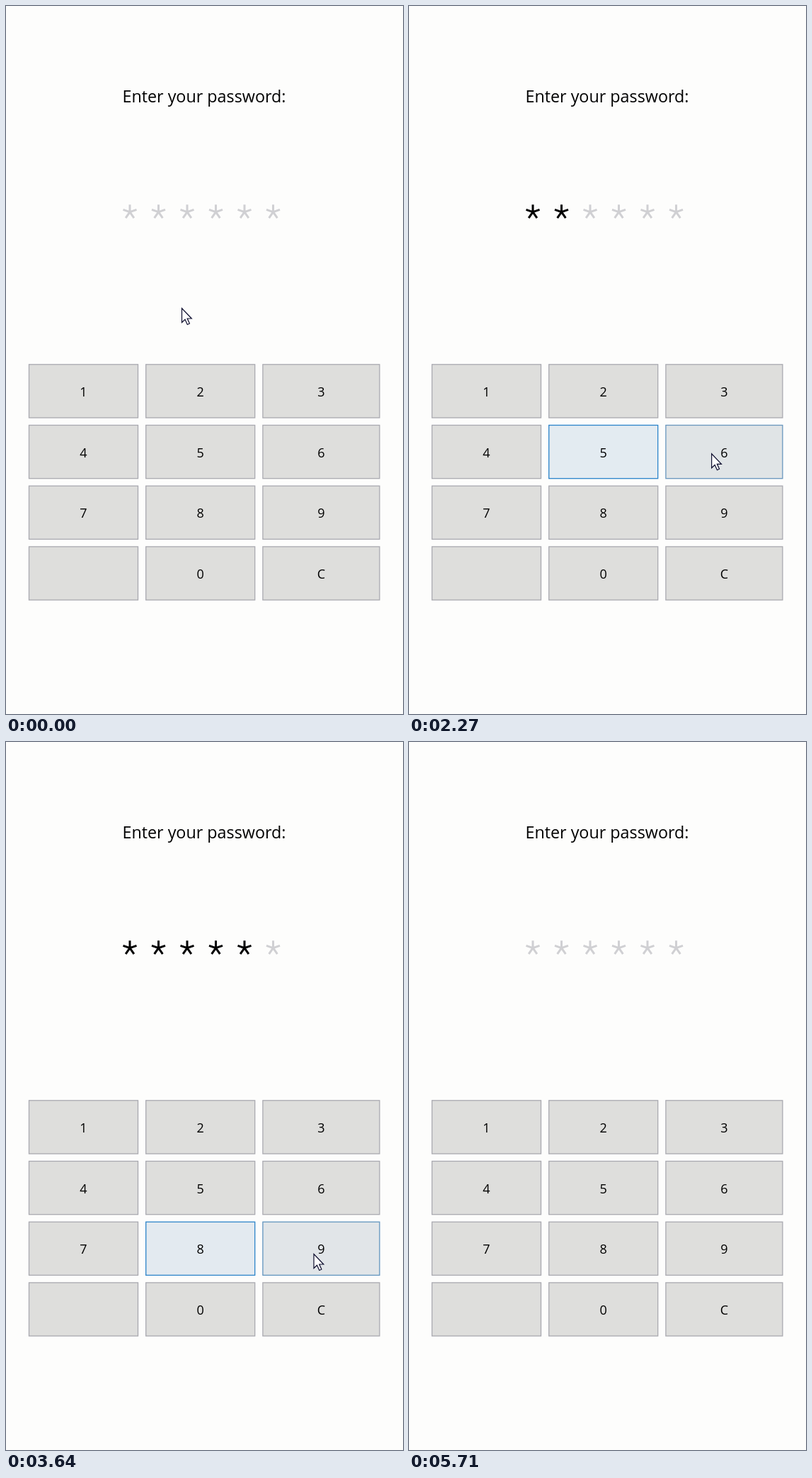
Animation of 561 by 999 pixels, one loop 5740 ms. Source, as an HTML page with a canvas:

```html
<!DOCTYPE html>
<html lang="en">
<head>
<meta charset="utf-8">
<title>Password keypad</title>
<style>
  html, body { margin: 0; width: 100%; height: 100%; overflow: hidden; background: #fdfdfc; }
  canvas { display: block; }
</style>
</head>
<body>
<canvas id="stage" width="561" height="999"></canvas>
<script>
const ctx = document.getElementById('stage').getContext('2d');
const LOOP = 5740, STEP = 10, CURSOR_GONE = 5690;
const TRAVEL = 220, LEAD = 100, HOLD = 120;   // glide time, pause before a press, press length
const FADE_IN = 200, FADE_OUT = 450;

// Button states as [fill, border]
const NORMAL = [[222, 222, 220], [169, 169, 176]];
const HOT = [[228, 238, 246], [10, 122, 208]];
const PRESSED = [[205, 230, 245], [20, 75, 115]];

// Where the cursor rests: arrival time, position, key pressed there
const stops = [
  { at: 0, x: 248, y: 426 },
  { at: 840, x: 257, y: 433 },
  { at: 1310, x: 105, y: 548, key: '1' },
  { at: 1790, x: 270, y: 617, key: '5' },
  { at: 2300, x: 435, y: 632, key: '6' },
  { at: 2790, x: 127, y: 648, key: '4' },
  { at: 3220, x: 272, y: 722, key: '8' },
  { at: 3660, x: 438, y: 722, key: '9' },
  { at: 4500, x: 449, y: 819, key: 'C' },
  { at: 5100, x: 440, y: 470 },
  { at: 5650, x: 250, y: 430 }
];
const presses = stops.filter(s => s.key).map(s => ({ key: s.key, down: s.at + LEAD, up: s.at + LEAD + HOLD }));

const buttons = [...'123456789 0C'].map((label, i) => {
  const col = i % 3;
  return {
    label, x: 32.5 + col * 165.2, y: 505.8 + Math.floor(i / 3) * 85.7,
    w: col < 2 ? 154 : 165, h: 75.2
  };
});

const mix = (a, b, k) => a + (b - a) * k;
const blend = (a, b, k) => a.map((v, i) => mix(v, b[i], k));
const rgb = c => `rgb(${c.map(Math.round)})`;

function cursorAt(t) {
  let { x, y } = stops[0];
  for (const stop of stops) {
    const k = Math.min(1, Math.max(0, (t - stop.at) / TRAVEL + 1));
    const eased = k * k * (3 - 2 * k);
    x = mix(x, stop.x, eased);
    y = mix(y, stop.y, eased);
  }
  return { x, y };
}

// Hover level of every button, replayed from the start of the loop
function hoverLevels(t) {
  const levels = buttons.map(() => 0);
  for (let s = 0; s <= t; s += STEP) {
    const c = cursorAt(s);
    buttons.forEach(({ x, y, w, h }, i) => {
      const over = c.x >= x && c.x <= x + w && c.y >= y && c.y <= y + h;
      const change = over ? STEP / FADE_IN : -STEP / FADE_OUT;
      levels[i] = Math.min(1, Math.max(0, levels[i] + change));
    });
  }
  return levels;
}

function drawText(text, x, y, size) {
  ctx.font = `${size}px "Open Sans", "Noto Sans", sans-serif`;
  ctx.textAlign = 'center';
  ctx.fillStyle = '#000';
  ctx.fillText(text, x, y);
}

function drawStar(x, y, filled) {
  ctx.strokeStyle = filled ? '#000' : '#d0d0d3';
  ctx.lineWidth = 3;
  ctx.beginPath();
  for (let i = 0; i < 5; i++) {
    const a = -Math.PI / 2 + i * Math.PI * 0.4;
    ctx.moveTo(x, y);
    ctx.lineTo(x + 10 * Math.cos(a), y + 10.5 * Math.sin(a));
  }
  ctx.stroke();
}

function drawButton({ label, x, y, w, h }, level, pressed) {
  const [fill, border] = pressed ? PRESSED : NORMAL.map((c, i) => blend(c, HOT[i], level));
  ctx.fillStyle = rgb(fill);
  ctx.strokeStyle = rgb(border);
  ctx.lineWidth = 1.3;
  ctx.fillRect(x, y, w, h);
  ctx.strokeRect(x, y, w, h);
  drawText(label, x + w / 2, y + 45.2, 18);
}

function drawCursor({ x, y }) {
  ctx.save();
  ctx.translate(x, y);
  ctx.fillStyle = '#fff';
  ctx.strokeStyle = '#0c0c2c';
  ctx.lineWidth = 1.2;
  const arrow = new Path2D('M.5 .5V20.5L5 16.2L8.3 23.5L11.4 22L8.2 15H14.3Z');
  ctx.fill(arrow);
  ctx.stroke(arrow);
  ctx.restore();
}

function draw(t) {
  ctx.fillStyle = '#fdfdfc';
  ctx.fillRect(0, 0, 561, 999);
  drawText('Enter your password:', 280, 136, 23.3);

  const clicks = presses.filter(p => t >= p.up).length;
  const typed = clicks % presses.length;   // the last press clears
  for (let i = 0; i < 6; i++) drawStar(175 + i * 40.5, 290.7, i < typed);

  const levels = hoverLevels(t);
  const held = presses.find(p => t >= p.down && t < p.up);
  buttons.forEach((b, i) => drawButton(b, levels[i], held && held.key === b.label));
  if (t < CURSOR_GONE) drawCursor(cursorAt(t));
}

function frame() {
  draw(performance.now() % LOOP);
  requestAnimationFrame(frame);
}
frame();
</script>
</body>
</html>
```
